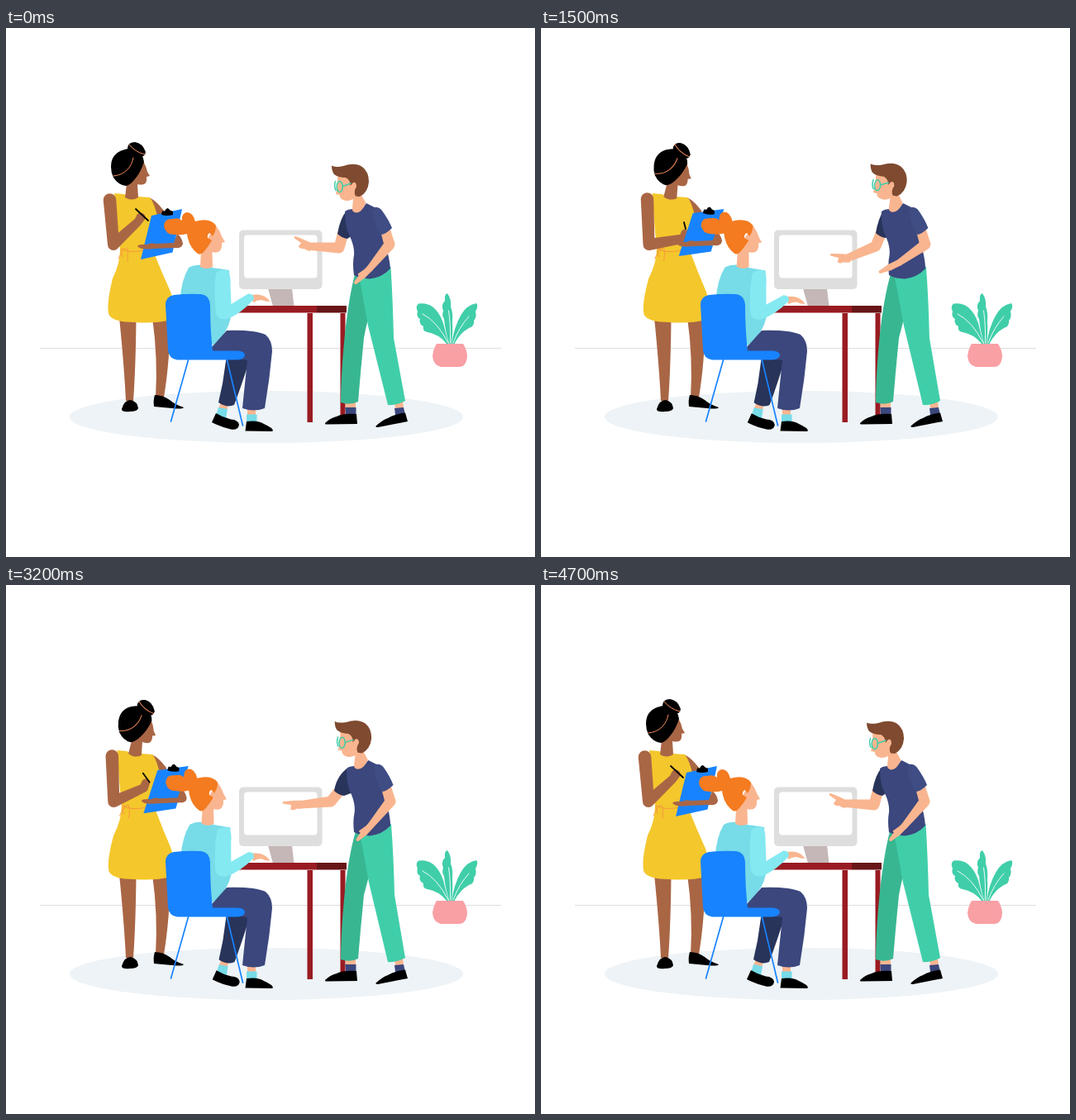
An HTML page for the animation above (4800 ms loop, 640x640 px).

```html
<!DOCTYPE html>
<html lang="en">
<head>
<meta charset="utf-8">
<title>Team at a desk</title>
<style>
html, body { margin: 0; width: 100%; height: 100%; overflow: hidden; background: #fff; }
svg { display: block; width: 100vw; height: 100vh; }
.brown { fill: #a96645; }
.skin { fill: #f9b58f; }
.navy { fill: #3b477d; }
.dark { fill: #28345a; }
.green { fill: #40cea9; }
.blue { fill: #1883ff; }
.cyan { fill: #77dbe8; }
.line { fill: none; stroke-linecap: round; }
</style>
</head>
<body>
<svg viewBox="0 0 640 640">
  <ellipse cx="315" cy="470.5" rx="238" ry="31.5" fill="#edf3f6"/>
  <path d="M41 387.5H599" stroke="#dedede"/>

  <g id="plant">
    <path class="green" d="M536.5 383Q531 365 530 352Q527 348 529 342Q526 335 531 330Q530 322 534 321Q539 328 538 337Q541 345 540 355Q541 370 538.5 383Z"/>
    <path class="green" d="M534 383Q524 370 508 367.500Q504 366 505 361Q499 358 501 352Q496 349 498 343Q495 337 499 333.500Q510 332 517 338Q525 345 529 357Q532 370 536 383Z"/>
    <path class="green" d="M539 383Q542 362 550 348Q557 335 569 333Q572 336 568 343Q570 350 566 354Q567 361 560 363Q549 369 542 383Z"/>
    <path class="line" stroke="#fff" stroke-width=".9" d="M535 381Q522 355 504 346M537.500 381Q538 357 535.500 342M541 381Q548 362 560 349"/>
    <path fill="#f9a0a5" d="M521 382H553Q558 390 558 397Q557 410 548 410H526Q517 408 516 397Q517 388 521 382Z"/>
  </g>

  <g id="writer">
    <path class="brown" d="M137 350H157.500Q157 410 154 451H145Q143 410 137 350ZM177 350H199Q198 405 191 447H181Q184 400 177 350Z"/>
    <path d="M140 461Q143 450 151 450Q159 452 160 460Q159 464 150 464Q140 465 140 461ZM180 444Q190 444 198 450Q205 456 215 459Q214 461 206 460.500L179 458Q178 450 180 444Z"/>
    <g id="dress">
      <path class="brown" d="M172 205Q179 206 191 221L193 238L178 236Z"/>
      <path fill="#f4c72c" d="M131 200L143 201Q152 208 160 204L174 205Q180 212 184 232Q184 262 179 272Q189 297 199 319Q206 338 200 353Q180 358 155 356Q130 356 124.500 347Q121 335 129 303Q138 285 138 268Q133 225 131 200Z"/>
      <path class="line" stroke="#f79a3c" d="M139 267Q150 273 167 269M143 268Q136 264 141 277M143 268Q149 261 147 282M143 268Q139 272 136 279"/>
    </g>
    <g id="writerHead">
      <path class="brown" d="M166 161Q170 168 171 174L174 179L170 180Q171 187 167 189Q162 190 159 189L160 205Q152 210 144 205L146 188Q150 172 166 161Z"/>
      <path d="M127 168Q127 152 142 147.500Q150 145 157 147Q166 152 167 162Q163 175 155 184Q150 190 145 191Q136 190 130 181Q127 175 127 168ZM147 145Q148 138 156 138Q165 139 169 150Q168 157 160 156Q150 155 147 145Z"/>
      <path class="line" stroke="#f28a5a" d="M130 179C144 178 152 168 154 157M149 141Q156 150 168 153"/>
    </g>
    <path id="writerArm" class="brown"/>
    <g id="board">
      <path class="blue" d="M176 227L213 219L201.500 271.500L163 280Z"/>
      <path d="M188 226L189 221.500L192 221.500Q195 215 198.500 220.500L202 222L202 226Q195 228 188 226Z"/>
    </g>
    <path id="pen" class="line" stroke="#000" stroke-width="1.8"/>
    <path id="holdArm" class="brown" d="M207 249Q213 253 214 261Q213 267 205 266L178 267Q163 269 159 264Q161 261 171 262Q175 259 181 261L203 260Z"/>
  </g>

  <g id="desk">
    <path fill="#c5b7b7" d="M317 315H346L348.500 337H323Z"/>
    <rect x="282" y="244.500" width="100.500" height="71.500" rx="5" fill="#dedede"/>
    <rect x="288" y="250.500" width="88.500" height="52" rx="4" fill="#fff"/>
    <path fill="#991b22" d="M268 336H376V344.500H268ZM364.500 345H371V477H364.500ZM404.500 345H410.500V470H404.500Z"/>
    <path fill="#681518" d="M376 336H412V344.500H376Z"/>
  </g>

  <g id="guide">
    <path id="pointArm" class="skin"/>
    <path id="pointHand" class="skin" d="M5 -5L-5 -5.500L-18 -5Q-21 -3.500 -18 -2.200L-9 -.5L-10 5Q-6 7 -3 4.500L5 4.500Z"/>
    <path id="pointSleeve" class="dark"/>
    <path class="skin" d="M411 451H423V460H411ZM470 451H480L481 460H471Z"/>
    <path class="navy" d="M410.500 459H423.500V469H411ZM470 460L481 459L483 468H471Z"/>
    <path d="M386 478Q392 472 400 470Q408 466 424 467L425 479L388 479.500Q386 480 386 478ZM448 481Q456 474 462 472Q470 467 483 465.500L486 476Q465 480 450 483Q446 483 448 481Z"/>
    <path id="backLeg" fill="#38b692"/>
    <path id="frontLeg" class="green"/>
    <path id="shirt" class="navy" d="M410 222Q414 219 419 219Q428 224 436 212L446 217Q455 240 459 262Q464 278 465 291Q455 302 440 303.500Q428 303 421 299Q419 285 421 275Q422 264 415 250Q410 240 410 222Z"/>
    <g id="guideHead">
      <path class="skin" d="M401 178Q410 176 416 182L425 187L430 202L435.500 212Q430 224 423 223.500Q418 222 419 218L420 207Q412 211 406 207Q403 204 404 202L399 201Q402 190 401 178Z"/>
      <path fill="#7f4a30" d="M394 166.500Q398 169 408 167Q422 162 431 168Q439 174 439 186Q438 199 428 204L423 203.500Q420 198 424 192Q424 186 420 187L416.500 191Q417 184 411 181Q402 181 397 177Q394 173 394 166.500Z"/>
      <g class="line" stroke="#40cea9" stroke-width="1.5">
        <ellipse cx="403.700" cy="192" rx="3.600" ry="6.500"/>
        <path d="M398.500 185.500Q396.500 191 399 196.500M407.300 191.500L417 188"/>
      </g>
    </g>
    <path id="restArm" class="skin"/>
    <path id="restSleeve" fill="#3f4d84" d="M445 217Q451 216 455 221Q463 232 467 242Q460 249 454 250Q446 240 443 222Z"/>
  </g>

  <g id="typist">
    <g id="backShin">
      <path class="skin" d="M260 453L269 455L267 463L257 460Z"/>
      <path class="cyan" d="M257 459L268 461L266 473L254 469Z"/>
      <path d="M254 466Q262 471 272 473.500Q281 474 282 480Q281 487 272 485.500Q258 482 249 477Z"/>
      <path class="dark" d="M267 396Q275 388 293 393L292 410Q284 435 276 456Q267 460 257 453L262 430Z"/>
    </g>
    <path class="skin" d="M292 459H302V469H292Z"/>
    <path class="cyan" d="M291 467.500H303.500V478H291Z"/>
    <path d="M291 476Q305 474 312 479Q323 484 323 487L322 488L289.500 487.500Z"/>
    <g id="torso">
      <path class="cyan" d="M237 287Q228 286 221 290Q212 305 210.500 330L235 350L250 384Q268 370 272 350L270 293L250 290Z"/>
      <path class="skin" d="M253 238Q259 245 261 252L265 259L261 260Q262 268 257 271Q253 272 249.500 271L250 289Q243 293 235 289L236 270Z"/>
      <path fill="#f47b20" d="M191 240Q191 230 202 231Q209 229 213 233Q212 224 219 223Q226 223 229 234Q247 229 254 239Q254 246 250 252L247 248Q243 249 244 254L249 257Q245 264 240 270Q236 275 232 273Q221 265 219 249Q212 251 204 250Q193 250 191 240Z"/>
      <g id="typeArm">
        <path class="skin" d="M297 323Q308 321.500 314 325.500Q319 329 319 331Q314 331 309 329Q304 329 299 332Z"/>
        <path fill="#85e9f1" d="M254 297Q258 292 268 293Q272 298 271.500 310L272.500 334L293 321.500Q300 321 300 328Q285 345 268 352Q256 354 254 345Q251 320 254 297Z"/>
      </g>
    </g>
    <path class="navy" d="M249 386Q258 376 267 366Q300 365 314 371Q322 378 322 391Q319 425 313 460Q300 465 286 460Q289 430 292 402L249 396Z"/>
    <path class="line" stroke="#1883ff" stroke-width="1.700" d="M221 400L199.500 476M267 400L286.500 481"/>
    <path class="blue" d="M193 335Q193 325 203 323Q220 321 236 322Q246 323 247 335Q247 365 250 390.500L280 390.500Q289 391 289 396Q288 401.500 278 401.500L207 401.500Q197 400 196 390Z"/>
  </g>
</svg>
<script>
const LOOP = 4800, STEP = 100;

const $ = id => document.getElementById(id);
const draw = (id, d) => $(id).setAttribute("d", d);
const move = (id, how) => $(id).setAttribute("transform", how);

const ease = u => {
  u = Math.min(1, Math.max(0, u));
  return u * u * (3 - 2 * u);
};
// Eases up from a to b, holds, and eases down from c to d
const pulse = (t, a, b, c, d) => ease((t - a) / (b - a)) - ease((t - c) / (d - c));
const mix = (a, b, k) => a.map((n, i) => n + (b[i] - n) * k);
const skew = (deg, y) => `translate(0 ${y}) skewX(${deg}) translate(0 ${-y})`;

// Outline of a rounded, tapered limb through [x, y, width] joints
function limb(...joints) {
  let d = "";
  joints.forEach(([x, y, w], i) => {
    const r = w / 2;
    d += `M${x - r} ${y}a${r} ${r} 0 1 0 ${w} 0a${r} ${r} 0 1 0 ${-w} 0Z`;
    if (!i) return;
    const [px, py, pw] = joints[i - 1];
    const len = Math.hypot(x - px, y - py) || 1;
    const nx = (py - y) / len, ny = (x - px) / len, q = pw / 2;
    d += `M${px + nx * q} ${py + ny * q}L${x + nx * r} ${y + ny * r}`
      + `L${x - nx * r} ${y - ny * r}L${px - nx * q} ${py - ny * q}Z`;
  });
  return d;
}

function drawWriter(t) {
  const turn = pulse(t, 0, 1200, 3000, 4200);
  const write = pulse(t, 0, 1200, 2500, 4000);
  move("dress", skew(-1.34 * turn, 355));
  move("writerHead", `translate(${4 * turn} 0) rotate(${8 * turn} 152 207)`);
  move("board", `translate(${6 * turn} ${-2 * turn}) rotate(${4.5 * turn} 188.5 249)`);
  move("holdArm", `translate(${5 * turn} ${-3 * turn})`);

  const shoulder = [125.5 + 3 * turn, 208 - turn, 15.5];
  const wrist = mix([160, 234, 10], [172, 255, 11], write);
  const hand = mix([163, 229, 11], [174, 248, 9], write);
  draw("writerArm", limb(shoulder, [130 + write / 2, 262, 14], wrist, hand));
  draw("pen", `M${mix([157, 219], [173, 235], write)}L${mix([172, 233], [175, 243], write)}`);
}

function drawGuide(t) {
  const bow = pulse(t, 0, 1100, 1100, 2000);
  const bowAgain = pulse(t, 2200, 3500, 3500, 4800);
  const lower = pulse(t, 0, 1100, 1900, 3000);
  const reach = pulse(t, 1900, 2600, 3200, 4700);
  const lean = bow + .75 * bowAgain;
  const top = 3.5 * lean, hip = 1.6 * lean;

  const tilt = skew(-2.36 * lean, 300);
  move("shirt", tilt);
  move("restSleeve", tilt);
  move("guideHead", `translate(${top} ${-.8 * lean}) rotate(${7 * bow - lower + 2 * bowAgain} 428 215)`);

  const cx = 406 + 4 * lower - 4 * reach, cy = 249 - lower;
  const elbow = [403 + 2 * lower - 10 * reach, 266 - 2 * lower - 4 * reach, 13];
  const wrist = [365 + 4 * lower - 11 * reach, 264 + 15 * lower + 2 * reach];
  draw("pointArm", limb([cx + 1.5, cy, 13], elbow, [...wrist, 9]));
  move("pointHand", `translate(${wrist}) rotate(${24 - 21 * lower - 27 * reach})`);
  draw("pointSleeve", `M${413 + top} 220Q${cx - 2} 230 ${cx - 5} ${cy}`
    + `Q${cx} ${cy + 5} ${cx + 7} ${cy + 6}L${420 + top} 250Z`);

  const [ex, ey] = mix([440, 291], [432, 284], lower);
  const [tx, ty] = mix([423, 308], [410, 295], lower);
  const rx = ex + 2 * lean, fx = tx + 3 * lean * (1 - lower) + lean;
  draw("restArm", limb([459 + hip, 245, 12], [464 + hip, 262, 13], [rx, ey, 8],
    [(rx + fx) / 2, (ey + ty) / 2, 8], [fx, ty, 4])
    + limb([rx, ey, 6], [rx - 13, ey + 7, 2.5]));

  draw("backLeg", `M${422 + hip} 298L${442 + hip} 300L${438 + hip} 352`
    + `Q${435 + hip} 364 433 375Q429 415 426 452Q416 457 405 453`
    + `Q405 420 410 370Q415 325 ${422 + hip} 298Z`);
  draw("frontLeg", `M${465.5 + hip / 2} 289Q${468 + hip} 330 ${469 + hip} 375`
    + `L483 451Q473 457 462 456L${438 + hip} 360Q${432 + hip} 325 ${427 + hip / 2} 300Z`);
}

function drawTypist(t) {
  const sway = (1 - Math.cos(4 * Math.PI * t / LOOP)) / 2;
  const press = pulse(t, 800, 1900, 2600, 4200);
  move("torso", `rotate(${1.2 * sway} 245 380)`);
  move("typeArm", `rotate(${2.4 * press} 262 300)`);
  move("backShin", `rotate(${-.6 * sway} 285 385)`);
}

const start = performance.now();
function frame() {
  const ms = (performance.now() - start) % LOOP;
  const t = Math.floor(ms / STEP) * STEP;
  drawWriter(t);
  drawGuide(t);
  drawTypist(t);
  requestAnimationFrame(frame);
}
frame();
</script>
</body>
</html>
```
